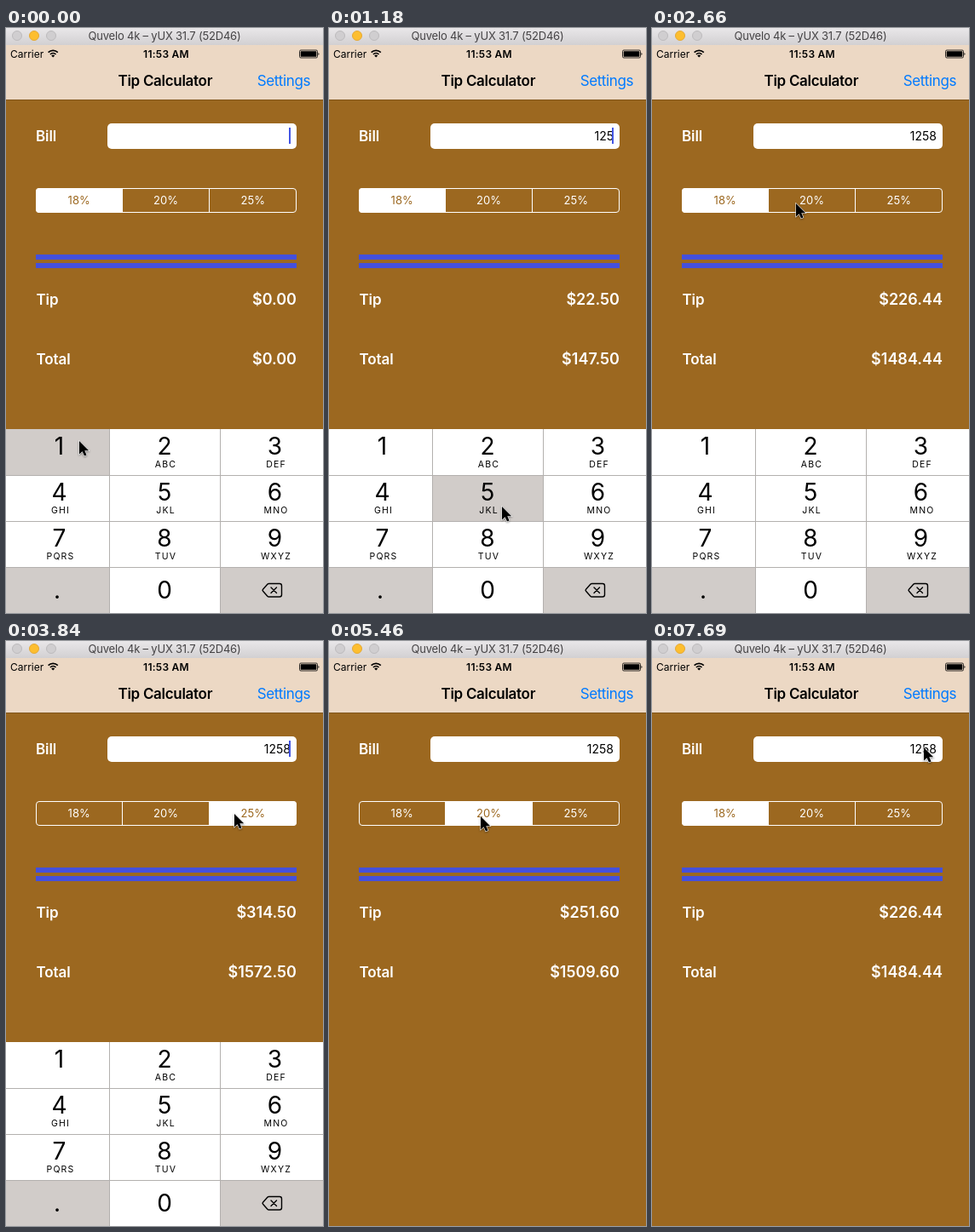
Animation of 372 by 687 pixels, one loop 8000 ms. Source, as an HTML page:

```html
<!DOCTYPE html>
<html lang="en">
<head>
<meta charset="utf-8">
<title>Tip Calculator</title>
<style>
  html, body { margin: 0; width: 100%; height: 100%; overflow: hidden; background: #9c6820; }
  svg { display: block; width: 372px; height: 687px; font-family: Inter, Roboto, sans-serif; }
  .mid { text-anchor: middle; }
  .end { text-anchor: end; }
  .label { font-size: 17px; font-weight: 600; letter-spacing: -.1px; fill: #fff; }
  .sum { font-size: 18px; font-weight: 600; fill: #fff; text-anchor: end; }
  .seg { font-size: 13px; text-anchor: middle; letter-spacing: .1px; }
  .digit { font-size: 28px; text-anchor: middle; }
  .letters { font-size: 10.5px; text-anchor: middle; letter-spacing: 1.2px; }
</style>
</head>
<body>
<svg viewBox="0 0 372 687">
  <defs>
    <linearGradient id="chrome" x2="0" y2="1">
      <stop stop-color="#e9e7e9"/><stop offset="1" stop-color="#d2d0d2"/>
    </linearGradient>
    <clipPath id="segClip"><rect x="35" y="188" width="306" height="29" rx="4"/></clipPath>
  </defs>

  <rect width="372" height="687" fill="#9c6820"/>

  <!-- window bar -->
  <rect width="372" height="20" fill="url(#chrome)"/>
  <g fill="#d0ced0" stroke="#bdbbbd">
    <circle cx="13" cy="9" r="5.5"/>
    <circle cx="33" cy="9" r="5.5" fill="#fdbe2f" stroke="#e5a936"/>
    <circle cx="53" cy="9" r="5.5"/>
  </g>
  <text class="mid" x="186" y="14" font-size="13" letter-spacing="-.2" fill="#454345">Quvelo 4k – yUX 31.7 (52D46)</text>

  <!-- status and navigation bars -->
  <rect y="20" width="372" height="64" fill="#ecd8c4"/>
  <rect y="84" width="372" height="1" fill="#000" opacity=".18"/>
  <text x="5" y="34.5" font-size="12">Carrier</text>
  <g fill="none" stroke="#000" stroke-width="1.7">
    <path d="M49.6 28.6a8 8 0 0 1 11.2 0M51.9 31a4.8 4.8 0 0 1 6.6 0"/>
    <path d="M53.2 32.4a2.8 2.8 0 0 1 4 0L55.2 34.6z" fill="#000" stroke="none"/>
  </g>
  <text class="mid" x="188" y="34.5" font-size="12" font-weight="600" letter-spacing=".25">11:53 AM</text>
  <rect x="344.5" y="26" width="21" height="9" rx="1.5" fill="none" stroke="#000" stroke-width=".8"/>
  <rect x="345.7" y="27.2" width="18.6" height="6.6" rx=".6"/>
  <path d="M366.5 29q2 1.5 0 3z"/>
  <text class="mid" x="186.8" y="68" font-size="17" font-weight="600" letter-spacing="-.3">Tip Calculator</text>
  <text class="end" x="357" y="68" font-size="17" letter-spacing="-.4" fill="#007aff">Settings</text>

  <!-- form -->
  <text class="label" x="35" y="133">Bill</text>
  <rect x="119" y="112" width="222" height="30" rx="5" fill="#fff"/>
  <text class="end" id="bill" x="334" y="131.5" font-size="14"></text>
  <rect id="caret" x="332" y="117" width="2" height="19" fill="#4355e4"/>

  <g id="segments" clip-path="url(#segClip)"></g>
  <path d="M136.5 188v29M238.5 188v29" stroke="#fff"/>
  <rect x="35.5" y="188.5" width="305" height="28" rx="3.5" fill="none" stroke="#fff"/>
  <g id="segNames"></g>

  <path d="M35 269h306M35 279h306" stroke="#4450dc" stroke-width="6"/>
  <text class="label" x="35.5" y="324.5">Tip</text>
  <text class="label" x="35.5" y="394.5">Total</text>
  <text class="sum" id="tip" x="341" y="324.5"></text>
  <text class="sum" id="total" x="341" y="394.5"></text>

  <g id="keyboard">
    <g id="keys"></g>
    <path d="M121.5 471v216M251.5 471v216M0 525.5h372M0 579.5h372M0 633.5h372" stroke="#b3b0ae"/>
    <g fill="none" stroke="#000" stroke-width="1.4" stroke-linejoin="round" stroke-linecap="round">
      <path d="M308.5 652.5h12.5q2.5 0 2.5 2.5v10.500q0 2.500-2.500 2.500h-12.500q-1 0-1.700-.8l-5.300-6q-1-1 0-2l5.300-6q.7-.7 1.700-.7z"/>
      <path d="M311 657l6.500 6.500M317.500 657l-6.500 6.500"/>
    </g>
  </g>

  <path id="pointer" d="M0 0V15.500L3.600 12.200 6 17.600 8.600 16.500 6.300 11.200H11.200Z" stroke="#fff" stroke-width="1.100" paint-order="stroke" style="filter:drop-shadow(0 1px 1px #0006)"/>
</svg>

<script>
const LOOP = 8000, STEP = 147.5;   // the screen refreshes once per STEP ms
const GRAY = '#d1ccc9', WHITE = '#fff', BROWN = '#9c6820';
const $ = id => document.getElementById(id);

function add(parent, tag, attrs, text = '') {
  const el = document.createElementNS('http://www.w3.org/2000/svg', tag);
  for (const k in attrs) el.setAttribute(k, attrs[k]);
  el.textContent = text;
  return parent.appendChild(el);
}

// keypad
const colX = [0, 121, 251, 372], colMid = [62.5, 186, 315.5];
const letters = ['', 'ABC', 'DEF', 'GHI', 'JKL', 'MNO', 'PQRS', 'TUV', 'WXYZ'];
const keys = [...'123456789.0', ''].map((name, i) => {
  const c = i % 3, y = 471 + 54 * (i / 3 | 0), fill = name === '.' || !name ? GRAY : WHITE;
  const box = add($('keys'), 'rect', { x: colX[c], y, width: colX[c + 1] - colX[c], height: 54, fill });
  add($('keys'), 'text', { class: 'digit', x: name === '.' ? 60 : colMid[c], y: y + (i > 8 ? 36.5 : 30) }, name);
  add($('keys'), 'text', { class: 'letters', x: colMid[c] + 1.5, y: y + 45 }, letters[i]);
  return { name, box, fill };
});

// tip rates
const rates = [18, 20, 25], segX = [35, 136.5, 238.5, 341];
const segments = rates.map((rate, i) => ({
  box: add($('segments'), 'rect', { x: segX[i], y: 188, width: segX[i + 1] - segX[i], height: 29, fill: WHITE }),
  name: add($('segNames'), 'text', { class: 'seg', x: (segX[i] + segX[i + 1]) / 2, y: 207 }, rate + '%')
}));

// timelines: [step, value...]
const typed = [[0, ''], [1, '1'], [5, '12'], [8, '125'], [12, '1258']];
const pressed = [[0, '1'], [2], [4, '2'], [6], [7, '5'], [9], [11, '8'], [13]];
const touched = [[0, 0], [19, 1], [25, 2], [36, 1], [43, 0]];
const chosen = [[0, 0], [20, 1], [26, 2], [37, 1], [44, 0]];
const caretOn = [[0, 1], [17, 0], [20, 1], [24, 0], [26, 1], [30, 0]];
const drop = [[0, 0], [32, 214], [33, 230]];
const route = [
  [0, 86, 485], [2, 86, 485], [4, 186, 495], [5, 188, 497], [7, 203, 562], [9, 203, 562],
  [11, 190, 624], [13, 190, 624], [16, 172, 222], [17, 169, 206], [21, 169, 206],
  [24, 262, 204], [25, 268, 203], [26, 268, 203], [29, 217, 345], [32, 217, 345],
  [35, 182, 212], [37, 178, 206], [39, 89, 212], [40, 86, 206], [45, 86, 206],
  [47, 115, 180], [49, 206, 122], [51, 298, 95], [52, 319, 125], [55, 319, 125]
];

const at = (line, n) => line.findLast(k => k[0] <= n)[1];

function along(n) {
  const i = route.findIndex(k => k[0] > n);
  const [n0, x0, y0] = route[i - 1], [n1, x1, y1] = route[i];
  const u = (n - n0) / (n1 - n0);
  return [x0 + (x1 - x0) * u, y0 + (y1 - y0) * u];
}

function draw(n) {
  const text = at(typed, n), bill = +text, touch = at(touched, n), choice = at(chosen, n);
  const tip = bill * rates[touch] / 100;
  $('bill').textContent = text;
  $('tip').textContent = '$' + tip.toFixed(2);
  $('total').textContent = '$' + (bill + tip).toFixed(2);
  $('caret').setAttribute('opacity', at(caretOn, n));
  segments.forEach(({ box, name }, i) => {
    box.setAttribute('opacity', i === choice ? 1 : i === touch ? .18 : 0);
    name.setAttribute('fill', i === choice ? BROWN : WHITE);
  });
  const down = at(pressed, n);
  for (const k of keys) k.box.setAttribute('fill', k.name && k.name === down ? GRAY : k.fill);
  $('keyboard').setAttribute('transform', `translate(0 ${at(drop, n)})`);
  $('pointer').setAttribute('transform', `translate(${along(n)})`);
}

function tick() {
  draw(Math.floor(performance.now() % LOOP / STEP));
  requestAnimationFrame(tick);
}
tick();
</script>
</body>
</html>
```
